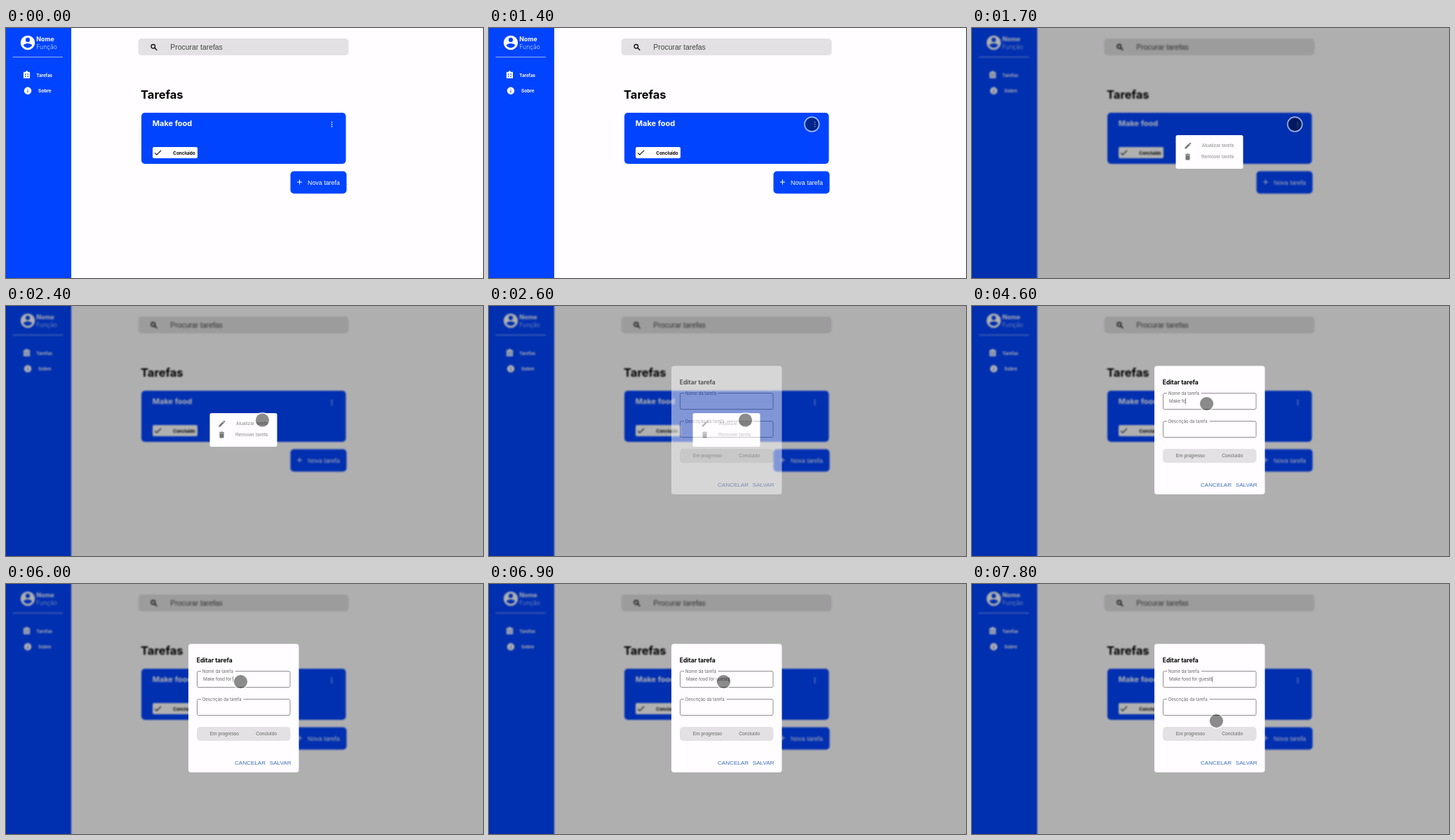
Recreate the animation shown at these times as an HTML page with a canvas. Size 680 px wide and 357 px high, loop 8000 ms.

```html
<!DOCTYPE html>
<html lang="pt">
<head>
<meta charset="utf-8">
<title>Tarefas</title>
<style>
html, body { margin: 0; width: 100%; height: 100%; overflow: hidden; background: #fffdff; }
canvas { display: block; }
</style>
</head>
<body>
<canvas id="stage" width="680" height="357"></canvas>
<script>
const W = 680, H = 357, LOOP = 8000;
const BLUE = '#0044ff', PAPER = '#fffdff', GREY = '#e3e1e3';
const BOLD = 'Inter, sans-serif';
const SANS = '"Liberation Sans", Arial, sans-serif';

const PERSON = 'M12 2a10 10 0 1 0 0 20a10 10 0 1 0 0-20zM12 5a3 3 0 1 1 0 6a3 3 0 1 1 0-6z' +
  'M12 19.2c-2.5 0-4.7-1.3-6-3.2 0-2 4-3.1 6-3.1s6 1.1 6 3.1c-1.3 1.9-3.5 3.2-6 3.2z';
const INFO = 'M12 2a10 10 0 1 0 0 20a10 10 0 1 0 0-20zM11 7h2v2h-2zM11 11h2v6h-2z';
const BOARD = 'M3 3h6a3 3 0 0 1 6 0h6v18H3zM7 8h3v3H7zM14 8h3v3h-3zM7 14h3v3H7zM14 14h3v3h-3z';
const CHECK = 'M9 16.2L4.8 12l-1.4 1.4L9 19 21 7l-1.4-1.4z';
const PENCIL = 'M3 17.2V21h3.8L17.8 9.9l-3.7-3.7zM20.7 7q.8-.7 0-1.4l-2.3-2.3q-.7-.7-1.4 0l-1.9 1.8 3.8 3.8z';
const BIN = 'M6 7h12v12q0 2-2 2H8q-2 0-2-2zM5 4h3.5l1-1h5l1 1H19v2H5z';

// Each pose holds until the next one: time, x, y
const POINTER = [
  [700, 213, 54], [800, 288, 110], [900, 352.5, 143.5], [1100, 484, 143],
  [1300, 468, 139.5], [1400, 460.3, 137.5], [1900, 425, 134], [2000, 390, 140],
  [2200, 383, 147], [2300, 371, 158], [2400, 365.5, 163], [2900, 357, 156],
  [3000, 342, 145], [3100, 334.5, 139.5], [7500, 337, 154], [7600, 341.5, 171.5],
  [7800, 348.4, 195.5]
];
const TASK = 'Make food for guests';
// Time, letters typed so far
const TYPED = [
  [3400, 0], [4000, 1], [4100, 2], [4200, 3], [4400, 5], [4600, 7], [4800, 8], [5000, 9],
  [5100, 11], [5400, 13], [6000, 14], [6200, 16], [6500, 17], [6700, 19], [6900, 20]
];

const held = (keys, t) => keys.filter(k => k[0] <= t).pop();

function layer() {
  const c = document.createElement('canvas');
  c.width = W;
  c.height = H;
  return c.getContext('2d');
}

function box(g, x, y, w, h, r, color) {
  g.fillStyle = color;
  g.beginPath();
  g.roundRect(x, y, w, h, r);
  g.fill();
}

function text(g, s, x, y, size, color, family = SANS, weight = 400) {
  g.font = `${weight} ${size}px ${family}`;
  g.fillStyle = color;
  g.fillText(s, x, y);
}

function icon(g, d, cx, cy, size, color) {
  g.save();
  g.translate(cx - size / 2, cy - size / 2);
  g.scale(size / 24, size / 24);
  g.fillStyle = color;
  g.fill(new Path2D(d), 'evenodd');
  g.restore();
}

function line(g, color, width, ...pts) {
  g.strokeStyle = color;
  g.lineWidth = width;
  g.beginPath();
  pts.forEach(([x, y]) => g.lineTo(x, y));
  g.stroke();
}

function disc(g, x, y, r, color) {
  g.fillStyle = color;
  g.beginPath();
  g.arc(x, y, r, 0, 7);
  g.fill();
}

function drawSidebar(g) {
  box(g, 0, 0, 93, H, 0, BLUE);
  icon(g, PERSON, 31, 21, 24.6, '#fff');
  text(g, 'Nome', 43.3, 19.2, 8.8, '#fff', BOLD, 700);
  text(g, 'Função', 43.3, 30, 8.6, 'rgba(255,255,255,.8)', BOLD, 300);
  line(g, 'rgba(255,255,255,.6)', 1, [9.5, 41.5], [81, 41.5]);
  icon(g, BOARD, 29.5, 67.2, 12.2, '#fff');
  text(g, 'Tarefas', 43.3, 70, 6.2, '#fff', BOLD, 700);
  icon(g, INFO, 31, 89.6, 12.6, '#fff');
  text(g, 'Sobre', 46, 92, 6.5, '#fff', BOLD, 700);
}

function drawPage(g) {
  box(g, 0, 0, W, H, 0, PAPER);
  drawSidebar(g);

  box(g, 188.5, 15, 300, 24, 5, GREY);
  g.strokeStyle = '#111';
  g.lineWidth = 1.3;
  g.beginPath();
  g.arc(209.8, 26.3, 2.8, 0, 7);
  g.stroke();
  line(g, '#111', 1.5, [211.8, 28.3], [215.2, 31.7]);
  text(g, 'Procurar tarefas', 234.3, 31, 10.4, '#444');

  text(g, 'Tarefas', 192, 101, 16.5, '#000', BOLD, 700);
  box(g, 193, 121, 291.5, 73, 5, BLUE);
  text(g, 'Make food', 208.8, 140, 11, '#fff', BOLD, 700);
  for (const y of [134.6, 137.6, 140.6]) disc(g, 464.5, y, 0.9, '#fff');
  box(g, 209, 170, 64, 16, 2, '#fff');
  icon(g, CHECK, 216.5, 178, 13.2, '#000');
  text(g, 'Concluído', 238.3, 181, 6.3, '#000', BOLD, 700);

  box(g, 405.5, 204.5, 80, 32, 5, BLUE);
  line(g, '#fff', 1, [415, 220], [422, 220]);
  line(g, '#fff', 1, [418.5, 216.5], [418.5, 223.5]);
  text(g, 'Nova tarefa', 430, 224, 8.9, '#fff');
}

function drawDimmed(g, page) {
  g.drawImage(page, 0, 0);
  g.filter = 'blur(0.9px)';
  g.drawImage(page, 0, 0);
  g.filter = 'none';
  box(g, 0, 0, W, H, 0, 'rgba(0,0,0,.31)');
}

function drawMenu(g) {
  box(g, 290.5, 153, 96, 48, 2.5, PAPER);
  icon(g, PENCIL, 308, 168, 12, '#777');
  icon(g, BIN, 307.5, 184, 12.2, '#777');
  text(g, 'Atualizar tarefa', 328, 170.2, 6.73, '#8c8c8c');
  text(g, 'Remover tarefa', 327, 186.2, 6.73, '#8c8c8c');
}

function drawField(g, y, label) {
  g.strokeStyle = '#8f8d8f';
  g.lineWidth = 1;
  g.beginPath();
  g.roundRect(272.5, y + 0.5, 132.5, 23, 2);
  g.stroke();
  g.font = `400 6px ${BOLD}`;
  box(g, 278, y - 1, g.measureText(label).width + 5, 3, 0, PAPER);
  text(g, label, 280, y + 3, 6, '#666', BOLD);
}

function drawEditor(g, t) {
  box(g, 260, 85.5, 157.5, 183.5, 4, PAPER);
  text(g, 'Editar tarefa', 271.8, 112, 8.5, '#000', BOLD, 700);
  drawField(g, 124, 'Nome da tarefa');
  drawField(g, 164, 'Descrição da tarefa');
  box(g, 272, 204, 133.5, 20, 5, GREY);
  text(g, 'Em progresso', 290.7, 216, 6.65, '#666');
  text(g, 'Concluído', 356.2, 216, 6.65, '#666');
  text(g, 'CANCELAR', 326, 258, 8.1, '#3f6fb8');
  text(g, 'SALVAR', 375.8, 258, 8.1, '#3f6fb8');

  const typed = held(TYPED, t);
  if (!typed) return;
  const s = TASK.slice(0, typed[1]);
  text(g, s, 281, 138, 6.64, '#6a6a6a');
  const x = Math.floor(281 + g.measureText(s).width);
  box(g, x, 132, 1, 8, 0, '#858585');
}

function drawPointer(g, t) {
  const pose = held(POINTER, t);
  if (!pose) return;
  const [, x, y] = pose;
  disc(g, x, y, 9.7, 'rgba(0,0,0,.45)');
  g.strokeStyle = 'rgba(255,255,255,.62)';
  g.lineWidth = 1.6;
  g.beginPath();
  g.arc(x, y, 10.4, 0, 7);
  g.stroke();
}

const view = document.getElementById('stage').getContext('2d');
const page = layer(), dimmed = layer(), editor = layer();
drawPage(page);
drawDimmed(dimmed, page.canvas);
drawEditor(editor, 0);

function render(t) {
  view.drawImage((t < 1700 ? page : dimmed).canvas, 0, 0);
  if (t >= 1700 && t < 2700) drawMenu(view);
  if (t >= 2700) {
    drawEditor(view, t);
  } else if (t >= 2600) {
    view.globalAlpha = 0.5;
    view.drawImage(editor.canvas, 0, 0);
    view.globalAlpha = 1;
  }
  drawPointer(view, t);
}

const start = performance.now();
function tick() {
  render((performance.now() - start) % LOOP);
  requestAnimationFrame(tick);
}
tick();
</script>
</body>
</html>
```
